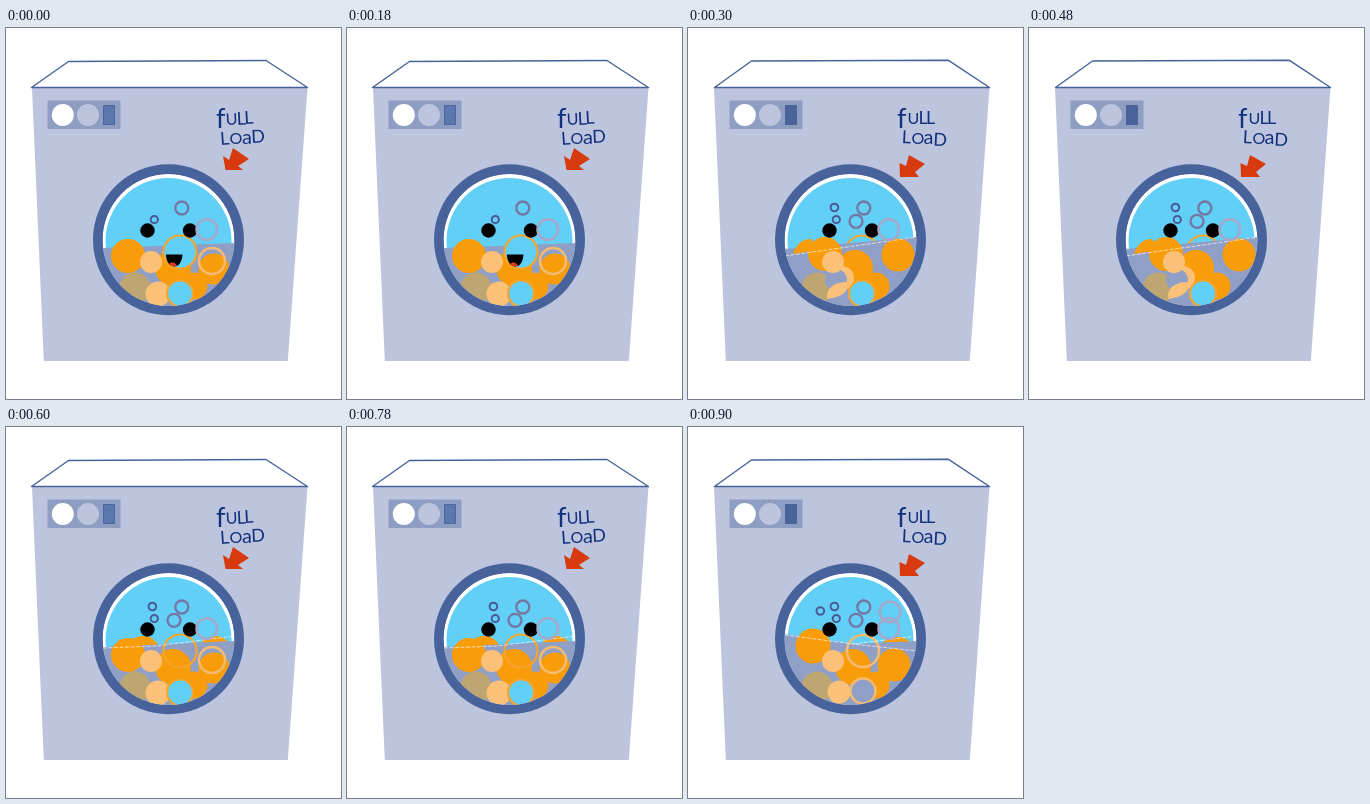
Write an HTML page without scripts that moves like this. It is 335 px wide and 371 px high and loops after 1.2 s.

```html
<!DOCTYPE html>
<html lang="en">
<head>
<meta charset="utf-8">
<title>Full load</title>
<style>
  html, body { margin: 0; width: 100%; height: 100%; overflow: hidden; background: #fff; }
  svg { display: block; width: 335px; height: 371px; }

  /* four held poses per loop; wobble alternates between two */
  .pose { animation: pose 1.2s step-end infinite; }
  .p2 { animation-delay: -.9s; }
  .p3 { animation-delay: -.6s; }
  .p4 { animation-delay: -.3s; }
  .wob { animation: wob .6s step-end infinite; }
  .w2 { animation-delay: -.3s; }
  .late { animation: late 1.2s step-end infinite; }
  @keyframes pose { 0% { visibility: visible } 25%, 100% { visibility: hidden } }
  @keyframes wob { 0% { visibility: visible } 50%, 100% { visibility: hidden } }
  @keyframes late { 0% { visibility: hidden } 25%, 100% { visibility: visible } }

  .o { fill: #f99c0a; }
  .p { fill: #fcc178; }
  .t { fill: #bea673; }
  .sea { fill: #8f9fc5; }
  .sky { fill: #62cff7; }
  .ro { stroke: #f5a52c; stroke-width: 2.2; }
  .rp { stroke: #f3bb72; stroke-width: 2.6; }
  .foam { fill: none; stroke: #fff; stroke-width: .8; stroke-dasharray: 4 1.5; opacity: .8; }
  .bub { fill: none; stroke: #4a5a94; stroke-width: 2; }
  .mid { stroke: #7477a4; stroke-width: 2.3; }
  .big { stroke: #a6a7c9; stroke-width: 2.5; }
  .edge { stroke: #45629b; stroke-width: 1.4; stroke-linejoin: round; }
  .ink { fill: #12307c; font: 18px Lato, "Open Sans", sans-serif; }
  .f { font-size: 27px; }
  .u { font-size: 16px; }
  .a { font-size: 20px; }
  .arrow { fill: #d63a0e; }
</style>
</head>
<body>
<svg viewBox="0 0 335 371">
  <defs>
    <clipPath id="glass"><circle cx="162.5" cy="212" r="66"/></clipPath>
    <g id="low">
      <circle class="t" cx="129" cy="260" r="15.5"/>
      <circle class="o" cx="188" cy="258" r="13.5"/>
    </g>
    <g id="pile">
      <circle class="o" cx="167" cy="240" r="18"/>
      <use href="#low"/>
      <circle class="o" cx="208" cy="241" r="15.5"/>
      <circle class="o" cx="122" cy="228" r="17"/>
      <circle class="p" cx="145" cy="234" r="11"/>
      <circle class="p" cx="152" cy="266" r="12.5"/>
      <circle class="sky ro" cx="174" cy="265.5" r="13"/>
    </g>
  </defs>

  <!-- cabinet -->
  <path fill="#bdc5de" d="M26 60H301.5L281.800 333H37.800Z"/>
  <path class="edge wob" fill="#fff" d="M25.500 59.500L62.500 33.500L260 32.500L301.500 59.500Z"/>
  <path class="edge wob w2" fill="#fff" d="M26.500 59.500L63.500 33L260.500 32.300L301.500 59.500Z"/>
  <path fill="#8d9ec2" d="M41.500 72.500H114.500V101H41.500Z"/>
  <circle fill="#fff" cx="56.800" cy="87" r="11"/>
  <circle fill="#bdc5de" cx="82" cy="87" r="11"/>
  <path class="wob" fill="#5c76ae" stroke="#4a659f" d="M97.500 77.500h11v19h-11z"/>
  <path class="wob w2" fill="#4a639b" d="M97 77h12v20h-12z"/>

  <!-- lettering and arrow -->
  <g class="wob">
    <text class="ink"><tspan class="f" x="210" y="100">f</tspan><tspan class="u" x="220" y="97" rotate="-3">U</tspan><tspan x="231 238.500" y="97 96" rotate="-3">LL</tspan></text>
    <text class="ink"><tspan x="214.500" y="117" rotate="-4">L</tspan><tspan class="u" x="223.500" y="116">O</tspan><tspan class="a" x="236" y="116">a</tspan><tspan x="245.500" y="115" rotate="-3">D</tspan></text>
    <path class="arrow" d="M227 120L243 131L232 138L237 142H219.500L217 128L223 132Z"/>
  </g>
  <g class="wob w2">
    <text class="ink"><tspan class="f" x="209" y="100">f</tspan><tspan class="u" x="219.500" y="96">U</tspan><tspan x="230.500 238" y="96 96">LL</tspan></text>
    <text class="ink"><tspan x="213.500" y="115" rotate="3">L</tspan><tspan class="u" x="223.500" y="116">O</tspan><tspan class="a" x="235.500" y="116">a</tspan><tspan x="245" y="117.500" rotate="3">D</tspan></text>
    <path class="arrow" d="M221 127L237 136L227 144L231 149H212L211.500 135L218 138Z"/>
  </g>

  <!-- door -->
  <circle fill="#48639b" cx="162.500" cy="211.800" r="75.500"/>
  <g clip-path="url(#glass)">
    <circle fill="#fff" cx="162.500" cy="212" r="66"/>
    <circle class="sky" cx="162.500" cy="213" r="63"/>

    <g class="pose p1">
      <path class="sea" d="M96 220L229 215V280H96Z"/>
      <use href="#pile"/>
      <circle class="sky ro" cx="174" cy="224" r="16.500"/>
      <circle class="rp" fill="none" cx="206" cy="233" r="13"/>
      <path d="M160 226.500H176.500C176 234 173 238.500 168 238.500C163 238 160 233 160 226.500Z"/>
      <path fill="#df3b20" d="M163 236Q167 232 171 237.500Q167 240 163 236Z"/>
    </g>

    <g class="pose p2">
      <circle class="sky ro" cx="174" cy="224" r="16.500"/>
      <path class="sea" d="M96 221L229 209V280H96Z"/>
      <path class="o" d="M105 226Q110 211 123 211L132 222Z"/>
      <circle class="o" cx="167" cy="240" r="18"/>
      <use href="#low"/>
      <circle class="o" cx="137" cy="226" r="17"/>
      <circle class="o" cx="210" cy="227" r="16.500"/>
      <circle class="p" cx="154" cy="250" r="12"/>
      <circle class="sea" cx="148" cy="252" r="11"/>
      <circle class="p" cx="145" cy="234" r="11"/>
      <path class="p" d="M139 271Q138 254 160 254Q162 268 139 271Z"/>
      <circle class="sky ro" cx="174" cy="265.500" r="13"/>
      <path class="foam" d="M97 228L229 209"/>
    </g>

    <g class="pose p3">
      <circle class="o" cx="137" cy="226" r="17"/>
      <circle class="o" cx="209" cy="226" r="17"/>
      <path class="sea" d="M96 220L229 214V280H96Z"/>
      <use href="#pile"/>
      <circle class="ro" fill="none" cx="174" cy="224" r="16.500"/>
      <circle class="rp" fill="none" cx="206" cy="233" r="13"/>
      <path class="foam" d="M97 221L150 219L229 209"/>
    </g>

    <g class="pose p4">
      <path class="o" d="M194 216Q208 204 223 215Z"/>
      <path class="sea" d="M96 207L165 217L229 214V280H96Z"/>
      <circle class="o" cx="165" cy="240" r="18"/>
      <use href="#low"/>
      <circle class="o" cx="125" cy="219" r="17.500"/>
      <circle class="o" cx="206" cy="238" r="16.500"/>
      <circle class="p" cx="145" cy="234" r="11"/>
      <circle class="p" cx="151" cy="265" r="11.500"/>
      <circle class="sea rp" cx="175" cy="264" r="12.500"/>
      <circle class="rp" fill="none" cx="175" cy="224" r="16"/>
      <path class="foam" d="M97 208L165 217L229 224M165 217L229 209"/>
    </g>

    <circle cx="141.500" cy="202.500" r="7.200"/>
    <circle cx="184" cy="202.500" r="7.200"/>
    <circle class="bub" cx="148.300" cy="191.500" r="3.600"/>
    <circle class="bub mid" cx="175.800" cy="180" r="6.500"/>
    <circle class="bub big" cx="200.800" cy="201.500" r="10.300"/>
    <g class="late">
      <circle class="bub" cx="146.400" cy="179.500" r="3.800"/>
      <circle class="bub mid" cx="168" cy="193.300" r="6.500"/>
    </g>
    <g class="pose p4">
      <circle class="bub" cx="132.300" cy="184" r="3.800"/>
      <circle class="bub big" cx="202" cy="185" r="10.300"/>
    </g>
  </g>
</svg>
</body>
</html>
```
